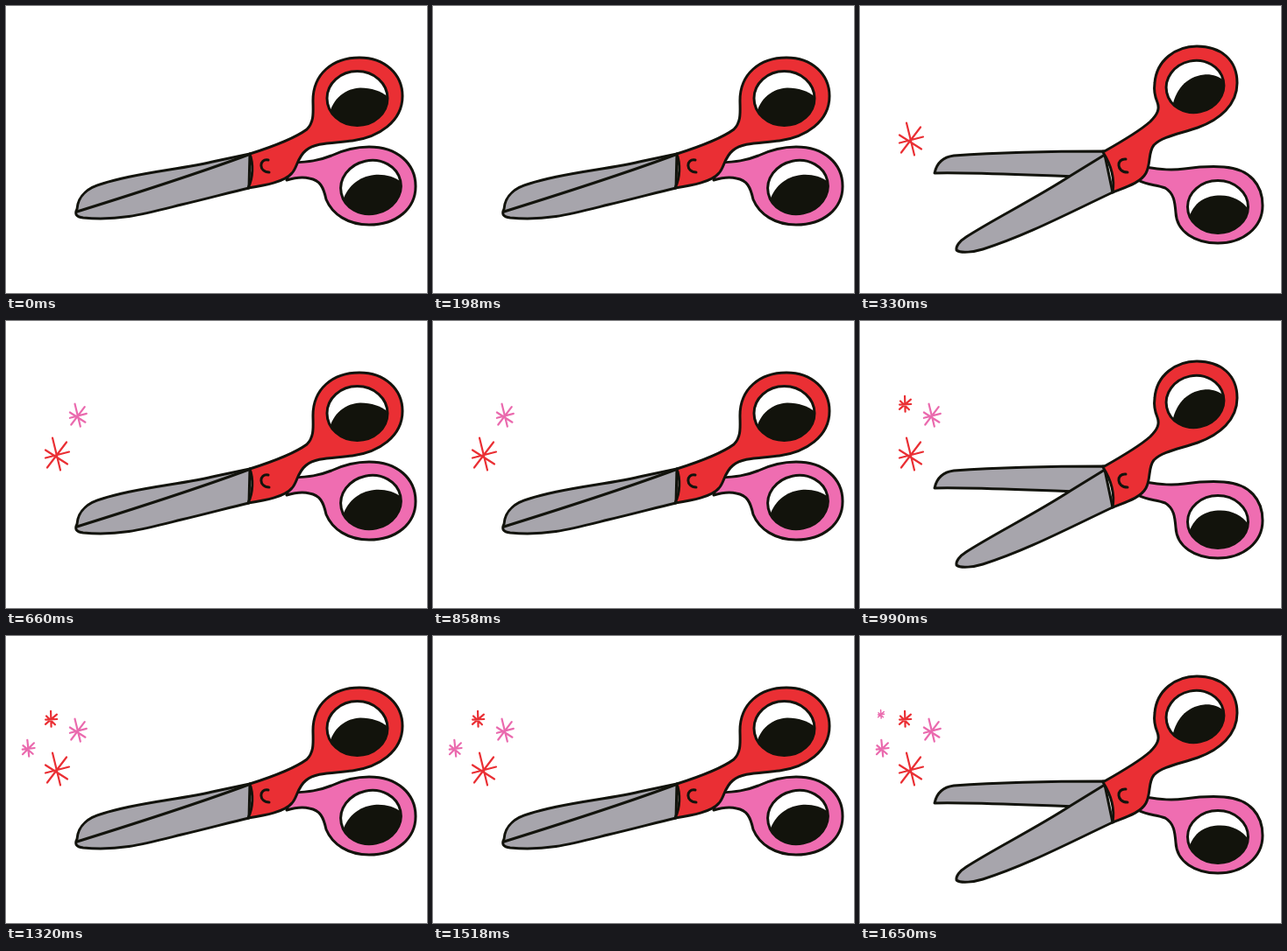
An HTML page for the animation above (1980 ms loop, 480 by 328 pixels).

```html
<!DOCTYPE html>
<html lang="en">
<head>
<meta charset="utf-8">
<title>Scissors</title>
<style>
  html, body { margin: 0; width: 100%; height: 100%; overflow: hidden; background: #fff; }
  svg { display: block; width: 480px; height: 328px; }

  .pose { stroke: #12130c; stroke-width: 3; stroke-linejoin: round; stroke-linecap: round; }
  .red { fill: #ea2f34; }
  .pink { fill: #ef6db1; }
  .steel { fill: #a7a5ac; }
  .white { fill: #fff; }
  .pupil { fill: #12130c; stroke: none; }
  .line { fill: none; }

  .star { stroke: #ea2f34; stroke-width: 2.2; stroke-linecap: round; visibility: hidden; }
  .star.rose { stroke: #ea6aae; }
  .star use { vector-effect: non-scaling-stroke; }

  /* Everything changes in hard cuts, one beat every 330 ms */
  .closed { animation: closed 660ms step-end infinite; }
  .open { animation: open 660ms step-end infinite; }
  .star { animation: 1980ms step-end infinite; }
  .s1 { animation-name: beat1; }
  .s2 { animation-name: beat2; }
  .s3 { animation-name: beat3; }
  .s4 { animation-name: beat4; }
  .s5 { animation-name: beat5; }

  @keyframes closed { 0% { visibility: visible; } 50%, 100% { visibility: hidden; } }
  @keyframes open { 0% { visibility: hidden; } 50%, 100% { visibility: visible; } }
  @keyframes beat1 { 0% { visibility: hidden; } 16.666%, 100% { visibility: visible; } }
  @keyframes beat2 { 0% { visibility: hidden; } 33.333%, 100% { visibility: visible; } }
  @keyframes beat3 { 0% { visibility: hidden; } 50%, 100% { visibility: visible; } }
  @keyframes beat4 { 0% { visibility: hidden; } 66.666%, 100% { visibility: visible; } }
  @keyframes beat5 { 0% { visibility: hidden; } 83.333%, 100% { visibility: visible; } }
</style>
</head>
<body>
<svg viewBox="0 0 480 328">
  <defs>
    <path id="rays" vector-effect="non-scaling-stroke"
      d="M-5-19L4 18M11-14L-11 15M-13 4L14-3M-13-5L12 11"/>
    <clipPath id="closedTop"><ellipse cx="400.5" cy="105.5" rx="34.5" ry="31"/></clipPath>
    <clipPath id="closedLow"><ellipse cx="416" cy="207" rx="34.5" ry="30.5" transform="rotate(-12 416 207)"/></clipPath>
    <clipPath id="openTop"><ellipse cx="382" cy="92" rx="33" ry="29.5" transform="rotate(-12 382 92)"/></clipPath>
    <clipPath id="openLow"><ellipse cx="408" cy="229.500" rx="34.500" ry="30"/></clipPath>
  </defs>

  <g class="pose closed">
    <path class="pink" d="M326 179C346 178 356 177 371 171C386 164 400 161 414 161C446 161 467 180 467 206C467 232 445 250 414 250C390 250 372 238 365 221C362 207 358 199 346 197C338 195 330 196 320 199Z"/>
    <ellipse class="white" cx="416" cy="207" rx="34.5" ry="30.5" transform="rotate(-12 416 207)"/>
    <path class="pupil" clip-path="url(#closedLow)" d="M382 228C388 206 402 195 420 193C432 192 443 195 452 202V245H382Z"/>

    <path class="steel" d="M278 169L240 177C200 187 150 190 110 203C95 207 82 216 81 232C78 238 80 241 88 242C130 246 160 237 200 227C230 220 255 213 277 208Z"/>
    <path class="line" d="M81 235C145 215 215 193 279 169"/>

    <path class="red" d="M278 169C300 162 328 152 343 141C352 132 350 120 350 108C350 78 372 59 403 59C432 59 452 78 452 103C452 132 425 150 395 154C370 157 353 156 342 165C332 173 332 185 326 191C318 201 295 205 276 208C282 196 282 180 278 169Z"/>
    <ellipse class="white" cx="400.5" cy="105.5" rx="34.5" ry="31"/>
    <path class="pupil" clip-path="url(#closedTop)" d="M368 126C372 105 388 94 404 93.500C418 93.500 429 98 437 105V140H368Z"/>
    <path class="line" d="M299 176C288 174 288 190 300 190"/>
  </g>

  <g class="pose open">
    <path class="steel" d="M85 191C87 181 93 173 107 171C150 168 210 166 277 166L284 172L245 195C180 193 130 190 85 191Z"/>
    <path class="pink" d="M277 166H291L288 176Z"/>
    <path class="pink" d="M324 184C345 187 355 188 370 186C385 184 400 183 415 184C445 186 459 205 459 228C459 253 437 271 408 271C382 271 361 258 360 236C359 224 358 214 348 208C338 204 328 205 317 199Z"/>
    <ellipse class="white" cx="408" cy="229.500" rx="34.500" ry="30"/>
    <path class="pupil" clip-path="url(#openLow)" d="M374 245C380 223 395 216.500 411 216.500C425 216.500 437 223 444 234V263H374Z"/>

    <path class="steel" d="M279 170L240 194C200 220 150 245 121 264C113 269 109 275 110 279C115 283 130 281 140 278C190 262 235 238 288 213Z"/>
    <path class="red" d="M277 167C300 154 320 142 331 132C339 124 342 118 339 110C336 103 335 95 336 88C338 62 360 46 384 46C412 46 430 62 430 88C430 113 410 130 385 139C365 146 345 149 335 159C328 168 332 180 326 191C320 202 303 207 288 213C291 195 284 178 277 167Z"/>
    <ellipse class="white" cx="382" cy="92" rx="33" ry="29.5" transform="rotate(-12 382 92)"/>
    <path class="pupil" clip-path="url(#openTop)" d="M355 120C359 95 372 81 392 78.500C402 77.500 411 81 418 88V126H355Z"/>
    <path class="line" d="M303 175C292 174 292 190 305 190"/>
  </g>

  <g class="star s1"><use href="#rays" transform="translate(58 152.500)"/></g>
  <g class="star rose s2" stroke-width="2"><use href="#rays" transform="translate(82 108) scale(.7)"/></g>
  <g class="star s3"><use href="#rays" transform="translate(51.500 95) rotate(12) scale(.47)"/></g>
  <g class="star rose s4"><use href="#rays" transform="translate(25.500 128.500) rotate(8) scale(.5)"/></g>
  <g class="star rose s5" style="stroke-width:1.5"><use href="#rays" transform="translate(24 89.500) rotate(10) scale(.25)"/></g>
</svg>
</body>
</html>
```
